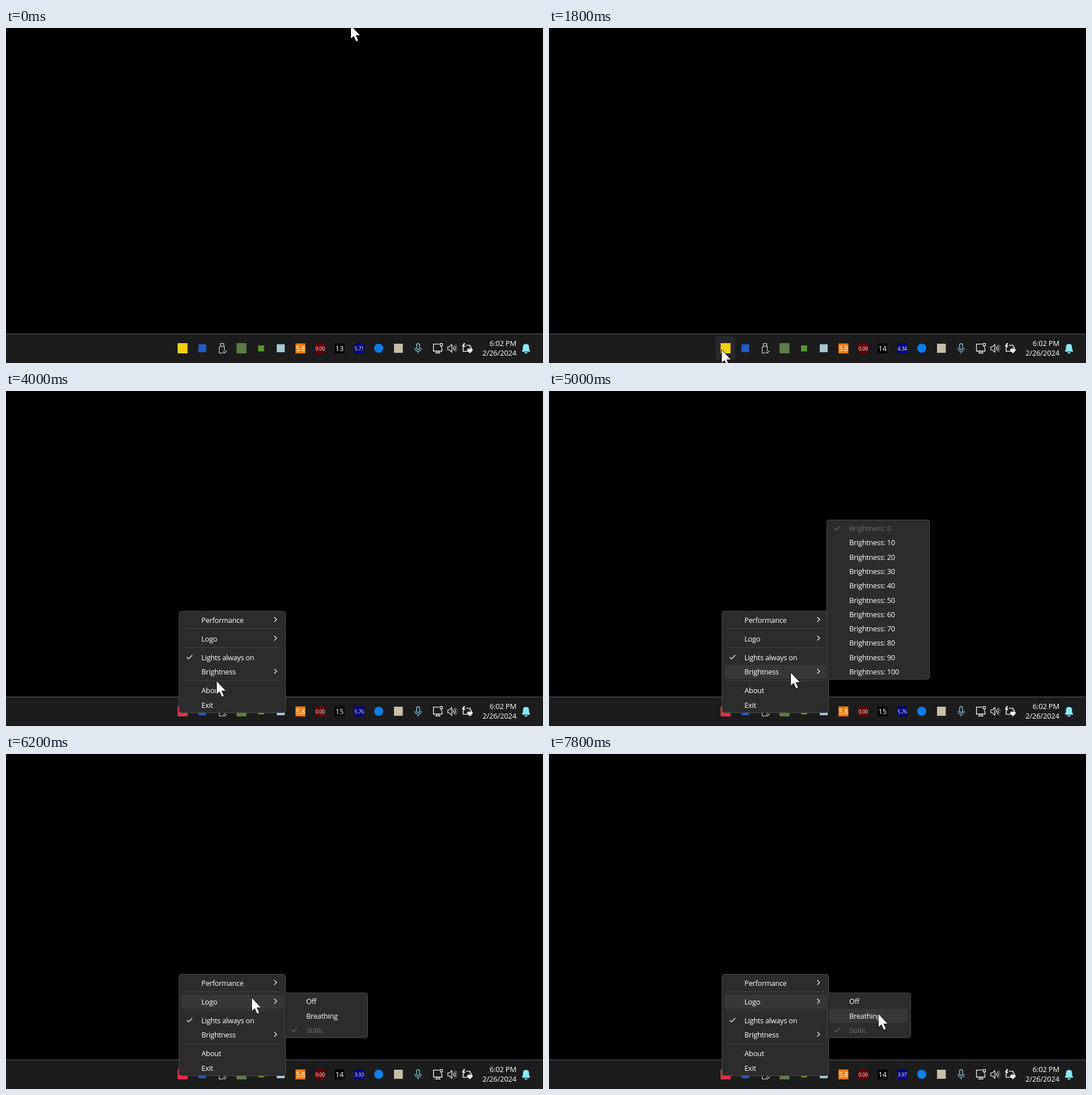
An HTML page with a canvas that plays this animation: 948x591 px, repeating every 8000 ms.

```html
<!DOCTYPE html>
<html lang="en">
<head>
<meta charset="utf-8">
<title>Tray menu</title>
<style>
  html, body { margin: 0; width: 100%; height: 100%; overflow: hidden; background: #000; }
  canvas { display: block; }
</style>
</head>
<body>
<canvas id="stage" width="948" height="591"></canvas>
<script>
const ctx = document.getElementById('stage').getContext('2d');
const LOOP = 8000, STEP = 200;
const FONT = '"Open Sans", "Noto Sans", sans-serif';

// Pointer tip: time, x, y
const PATH = [
  [0, 609, -4], [1200, 305, 568], [3600, 305, 568], [3800, 332, 546], [4000, 372, 512],
  [4400, 396, 503], [5000, 427, 497], [5400, 508, 478], [5800, 550, 354],
  [6000, 452, 430], [6800, 381, 432], [7200, 410, 435], [7800, 582, 459]
];
// Meter readings: time, load, power
const METERS = [
  [0, '13', '5.71'], [1400, '14', '4.34'], [3400, '15', '5.76'],
  [5400, '14', '3.93'], [7400, '14', '3.97']
];
const TIMES = { hover: 1200, red: 2200, menu: 3000, bright: 4600, brightEnd: 6000, logo: 6200 };

const MAIN = {
  x: 305, y: 388, w: 189, h: 180,
  rows: [
    { label: 'Performance', y: 404, more: true },
    { label: 'Logo', y: 437, more: true },
    { label: 'Lights always on', y: 470, check: true },
    { label: 'Brightness', y: 495.4, more: true },
    { label: 'About', y: 528.6 },
    { label: 'Exit', y: 554 }
  ],
  lines: [419.5, 452.5, 511.5]
};
const BRIGHT = {
  x: 490, y: 227, w: 182.5, h: 282, lines: [],
  rows: Array.from({ length: 11 }, (_, i) => ({
    label: 'Brightness: ' + i * 10, y: 242.6 + i * 25.28, check: i === 0, off: i === 0
  }))
};
const LOGO = {
  x: 490, y: 421, w: 149, h: 80, lines: [],
  rows: [
    { label: 'Off', y: 436.8 },
    { label: 'Breathing', y: 462 },
    { label: 'Static', y: 487.4, check: true, off: true }
  ]
};

function box(x, y, w, h, fill, r = 0) {
  ctx.fillStyle = fill;
  ctx.beginPath();
  ctx.roundRect(x, y, w, h, r);
  ctx.fill();
}

function disc(x, y, r, fill) {
  ctx.fillStyle = fill;
  ctx.beginPath();
  ctx.arc(x, y, r, 0, 7);
  ctx.fill();
}

function stroke(d, color, width = 1.2) {
  ctx.strokeStyle = color;
  ctx.lineWidth = width;
  ctx.stroke(new Path2D(d));
}

function text(str, x, y, size, color = '#fff', align = 'left', gap = 0) {
  ctx.font = `${size}px ${FONT}`;
  ctx.letterSpacing = gap + 'px';
  ctx.textAlign = align;
  ctx.fillStyle = color;
  ctx.fillText(str, x, y);
}

function pointerAt(t) {
  const i = PATH.findIndex(p => p[0] > t);
  if (i < 0) return PATH[PATH.length - 1].slice(1);
  const [t0, x0, y0] = PATH[i - 1], [t1, x1, y1] = PATH[i];
  let k = (t - t0) / (t1 - t0);
  if (i === 1) k = k * k * (3 - 2 * k);
  return [x0 + (x1 - x0) * k, y0 + (y1 - y0) * k];
}

function rowAt(menu, [x, y]) {
  if (x <= menu.x || x >= menu.x + menu.w) return undefined;
  return menu.rows.find(r => Math.abs(y - r.y) < 12.6);
}

function drawMenu(menu, active) {
  const { x, y, w, h } = menu;
  box(x, y, w, h, '#4a4a50', 5);
  box(x + 1, y + 1, w - 2, h - 2, '#2c2c2c', 4);
  for (const ly of menu.lines) stroke(`M${x + 10} ${ly}H${x + w - 9}`, '#444442', 1);
  for (const r of menu.rows) {
    if (r === active) box(x + 5, r.y - 12.5, w - 10.5, 25, '#373738', 4);
    const color = r.off ? '#6b6b6b' : '#fff';
    text(r.label, x + 40, r.y + 4.6, 12.8, color, 'left', -0.28);
    if (r.more) stroke(`M${x + 168.5} ${r.y - 5}l4.3 4.1l-4.3 4.1`, '#fff', 1.2);
    if (r.check) stroke(`M${x + 14} ${r.y - 0.6}l3.3 3.2l6.5 -6.6`, color, 1.2);
  }
}

function meter(x, fill, value, size, gap = 0) {
  box(x, 556.5, 17.5, 17.5, fill);
  text(value, x + 8.8, 565.5 + size * 0.37, size, '#fff', 'center', gap);
}

function drawSystemIcons() {
  const white = '#f4f4f4', cyan = '#8fdcea';
  // Removable drive
  stroke('M378.5 562V556.5H384.5V562M376.5 562H385.5V570M376.5 562V573.5H383M383 571l2.5 2.5l4 -4', '#dedede', 1.1);
  stroke('M380.5 559v1M382.5 559v1', '#dedede', 1);
  // Microphone
  ctx.beginPath();
  ctx.roundRect(724.8, 556.8, 5.4, 10.4, 2.7);
  ctx.strokeStyle = cyan;
  ctx.lineWidth = 1.2;
  ctx.stroke();
  stroke('M722 564.5v.5a5.5 5.5 0 0 0 11 0v-.5M727.5 570.5V574', cyan);
  // Wired display
  stroke('M765 557.6H754.6V570H769.6V564.5M757.5 573.4H767M760.5 570V573M764.5 570V573', white, 1.3);
  stroke('M766.5 556.6h4v4h-4zM768.5 560.6v4', white, 1.2);
  // Speaker
  stroke('M780 562.5h3l4 -4v13.5l-4 -4h-3z', white, 1.2);
  stroke('M789.3 562.6a4 4 0 0 1 0 5', white, 1.2);
  stroke('M791.3 560.2a7 7 0 0 1 0 9.8', white, 1.2);
  stroke('M793.3 558a10 10 0 0 1 0 14', '#777', 1.1);
  // Charging battery
  stroke('M812 559.6H819.4V564M807 564.5V570.4H816M821.5 562.5V566', white, 1.4);
  ctx.fillStyle = white;
  ctx.fill(new Path2D('M808 556l-3.4 6h2.8l-1.6 5l5.4 -6.6h-3l2.6 -4.4z'));
  ctx.fill(new Path2D('M819 574l-4.3 -4.4a2.6 2.6 0 0 1 4.3 -3a2.6 2.6 0 0 1 4.3 3z'));
  // Bell
  ctx.fillStyle = '#86ebf7';
  ctx.fill(new Path2D('M918 557a5.4 5.4 0 0 0 -5.4 5.4v4.2l-1.7 3.2q-.3 1.2 .8 1.2h12.6q1.1 0 .8 -1.2l-1.7 -3.2v-4.2a5.4 5.4 0 0 0 -5.4 -5.4zM915.2 572h5.6a2.8 2.3 0 0 1 -5.6 0z'));
}

function drawTaskbar(t) {
  box(0, 539, 948, 52, '#1c1c1d');
  box(0, 539, 948, 1.4, '#45454e');
  if (t >= TIMES.hover && t < TIMES.menu) box(294, 544, 35, 42, '#28282a', 4);

  box(303, 556, 17.5, 18, t < TIMES.red ? '#f2d00e' : '#e62e46');
  box(339.5, 558, 14, 14, '#2459c4', 2);
  box(407, 556, 17.5, 18, '#5f7c46');
  box(445, 560, 10.5, 10.5, '#5c9a20');
  box(478, 558, 14, 14, '#a9c7d3');
  disc(658, 565, 8, '#0a7fec');
  box(685, 557, 15.5, 16, '#c9bfa8');

  const [, load, power] = METERS.filter(m => m[0] <= t).pop();
  meter(511, '#f27d0c', '5.8', 12, -0.5);
  meter(545.7, '#650004', '0.00', 9, -0.3);
  meter(580, '#000', load, 13, -0.2);
  meter(614.8, '#00007c', power, 9, -0.3);

  drawSystemIcons();
  text('6:02 PM', 901, 560.6, 13, '#fff', 'right', -0.2);
  text('2/26/2024', 901, 578.4, 13, '#fff', 'right', -0.2);
}

function drawPointer([x, y]) {
  ctx.save();
  ctx.translate(x, y);
  const arrow = new Path2D('M0 0V22.5L5 18L9.2 27.6L12.6 26.1L8.4 16.8H15.6Z');
  ctx.lineJoin = 'round';
  ctx.strokeStyle = '#000';
  ctx.lineWidth = 1.6;
  ctx.stroke(arrow);
  ctx.fillStyle = '#fff';
  ctx.fill(arrow);
  ctx.restore();
}

function draw(t) {
  const tip = pointerAt(t);
  ctx.fillStyle = '#000';
  ctx.fillRect(0, 0, 948, 591);
  drawTaskbar(t);
  if (t >= TIMES.menu) {
    let sub = null, owner;
    if (t >= TIMES.logo) [sub, owner] = [LOGO, MAIN.rows[1]];
    else if (t >= TIMES.bright && t < TIMES.brightEnd) [sub, owner] = [BRIGHT, MAIN.rows[3]];
    drawMenu(MAIN, owner || rowAt(MAIN, tip));
    if (sub) drawMenu(sub, rowAt(sub, tip));
  }
  drawPointer(tip);
}

const start = performance.now();
function tick() {
  const t = (performance.now() - start) % LOOP;
  draw(Math.floor(t / STEP) * STEP);
  requestAnimationFrame(tick);
}
tick();
</script>
</body>
</html>
```
